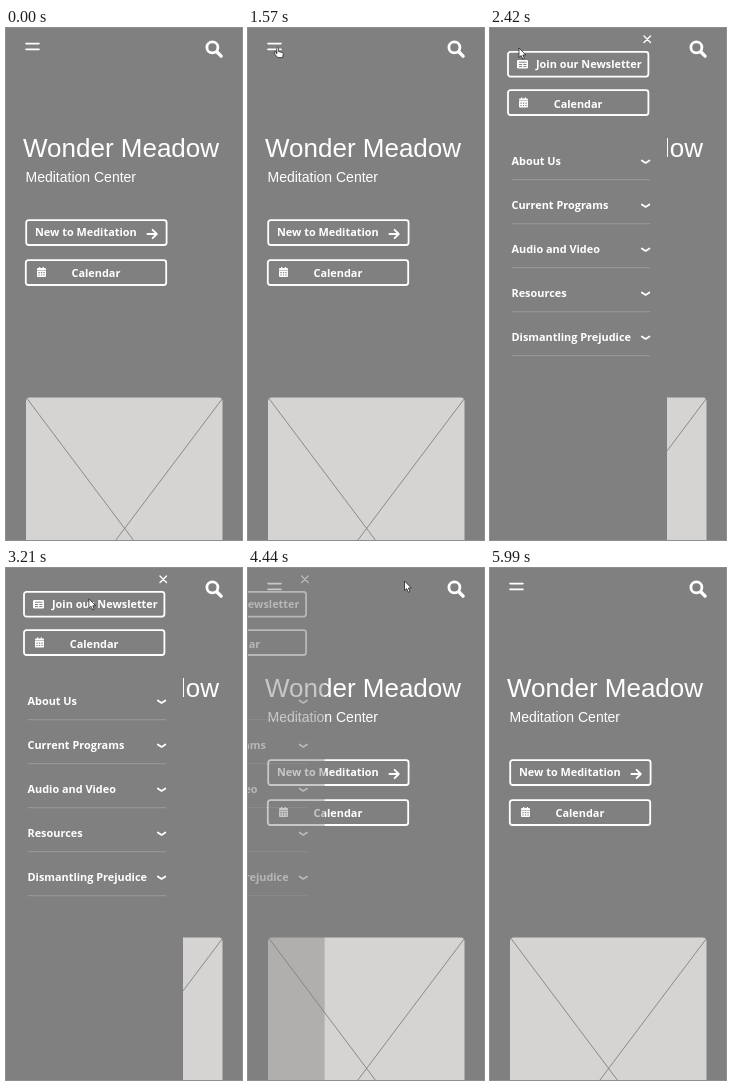
Animation of 236 by 512 pixels, one loop 6.42 s. Source, as an HTML page:

```html
<!DOCTYPE html>
<html lang="en">
<head>
<meta charset="utf-8">
<title>Menu drawer</title>
<style>
  html, body { margin: 0; width: 100%; height: 100%; overflow: hidden; background: #808080; }
  svg { display: block; width: 236px; height: 512px; }
  text { fill: #fff; font: 700 10.9px "Open Sans", "Noto Sans", sans-serif; }
  .title { font: 26px "Liberation Sans", Arial, sans-serif; }
  .sub { font: 14px "Liberation Sans", Arial, sans-serif; }
  .line { fill: none; stroke: #fff; stroke-linecap: round; stroke-linejoin: round; }
  .pointer { fill: #fff; stroke: #222; stroke-width: .8; stroke-linejoin: round; }
</style>
</head>
<body>
<svg viewBox="0 0 236 512">
  <defs>
    <g id="calendar">
      <path fill="#fff" d="M0 3V2Q0 1 1 1H2V0H3.3V1H5.7V0H7V1H8Q9 1 9 2V3ZM0 3.6H9V9Q9 10 8 10H1Q0 10 0 9Z"/>
      <path stroke="#808080" stroke-width="1.1" stroke-dasharray="1.3 1.2" d="M1.4 5.6H8M1.4 8H8"/>
    </g>
    <rect id="button" class="line" width="140.4" height="24.8" rx="2.5" stroke-width="1.8"/>
  </defs>

  <rect width="236" height="512" fill="#808080"/>
  <path class="line" stroke-width="1.6" d="M20 15.6H33M20 21.4H33"/>
  <g class="line">
    <circle cx="206.4" cy="19.4" r="5.5" stroke-width="2.8"/>
    <path stroke-width="3.4" d="M211 24L215.1 28.1"/>
  </g>
  <text class="title" x="17" y="129">Wonder Meadow</text>
  <text class="sub" x="19.5" y="153.5">Meditation Center</text>
  <use href="#button" x="20.2" y="192.2"/>
  <text x="29" y="208">New to Meditation</text>
  <path class="line" stroke-width="1.8" d="M141.4 206H150.4M146.6 201.8L150.8 206L146.6 210.2"/>
  <use href="#button" x="19.8" y="232.2"/>
  <use href="#calendar" x="31" y="239"/>
  <text x="65.5" y="249">Calendar</text>
  <rect x="20" y="369.5" width="196.5" height="262" rx="4" fill="#d5d4d2"/>
  <path stroke="#777" stroke-width=".8" d="M21 370.5L216 630M216.5 370.5L21 630"/>

  <g id="drawer">
    <rect width="177" height="512" fill="#808080"/>
    <path class="line" stroke-width="1.4" d="M154 8L160.5 14.5M160.5 8L154 14.5"/>
    <use href="#button" x="18" y="23.8"/>
    <rect x="27" y="32" width="11" height="8.5" rx="1.3" fill="#fff"/>
    <path stroke="#808080" d="M29 34.2H36.5M29 36.5H32M29 38.6H32M33.3 36.5H36.5M33.3 38.6H36.5"/>
    <text x="46" y="39.5">Join our Newsletter</text>
    <use href="#button" x="18" y="62.2"/>
    <use href="#calendar" x="29" y="69.5"/>
    <text x="63.7" y="79.5">Calendar</text>
  </g>

  <g id="cursor">
    <path id="arrow" class="pointer" d="M0 0V9.5L2.2 7.6L3.8 11.2L5.4 10.5L3.9 7H6.8Z"/>
    <path id="hand" class="pointer" d="M-.2 5.8V.6Q.7-1 1.6 .6V3.6L5.4 4.5Q6.4 4.8 6.3 6L5.6 9.6H.8L-2.3 6.2Q-2-.2 -.2 5.8Z"/>
  </g>
</svg>
<script>
const LOOP = 6420, WIDTH = 177, SLIDE = 265, STEP = 78;
const $ = id => document.getElementById(id);
const drawer = $("drawer"), cursor = $("cursor"), arrow = $("arrow"), hand = $("hand");
const clamp = v => Math.min(1, Math.max(0, v));
const easeOut = u => 1 - (1 - clamp(u)) ** 1.7;
const smooth = u => u * u * (3 - 2 * u);
const show = (el, on) => el.style.display = on ? "" : "none";
const within = (t, from, to) => t >= from && t < to;

["About Us", "Current Programs", "Audio and Video", "Resources", "Dismantling Prejudice"].forEach((label, i) => {
  const y = 137 + 44 * i;
  drawer.insertAdjacentHTML("beforeend", `<text x="21.5" y="${y}">${label}</text>
    <path class="line" stroke-width="1.7" d="M151.8 ${y - 4.5}L155.6 ${y - 2}L159.4 ${y - 4.5}"/>
    <path stroke="#a0a0a0" stroke-width=".8" d="M21.5 ${y + 14.7}H160"/>`);
});

const menu = { x: 29, y: 20 }, close = { x: 156.5, y: 13 };
const moves = [
  { at: 570, span: 680, from: { x: 240, y: 460 }, to: menu, sag: 0 },
  { at: 2870, span: 870, from: menu, to: close, sag: 14 },
  { at: 5140, span: 770, from: close, to: { x: 219, y: 495 }, sag: 0 }
];

// The cursor advances in steps, not continuously
function cursorAt(t) {
  const { at, span, from, to, sag } = moves.findLast(m => t >= m.at) ?? moves[0];
  const steps = Math.floor((t - at) / STEP) + 1;
  const e = smooth(clamp(steps * STEP / span));
  return [from.x + (to.x - from.x) * e, from.y + (to.y - from.y) * e + sag * 4 * e * (1 - e)];
}

function draw(t) {
  const open = easeOut((t - 2122) / SLIDE) - easeOut((t - 4338) / SLIDE);
  drawer.setAttribute("transform", `translate(${(open - 1) * WIDTH})`);
  drawer.setAttribute("opacity", open);

  const pointing = within(t, 1570, 1940) || within(t, 3820, 4200);
  cursor.setAttribute("transform", `translate(${cursorAt(t)})`);
  show(cursor, within(t, 570, 5990));
  show(hand, pointing);
  show(arrow, !pointing);
}

function frame() {
  draw(performance.now() % LOOP);
  requestAnimationFrame(frame);
}
frame();
</script>
</body>
</html>
```
